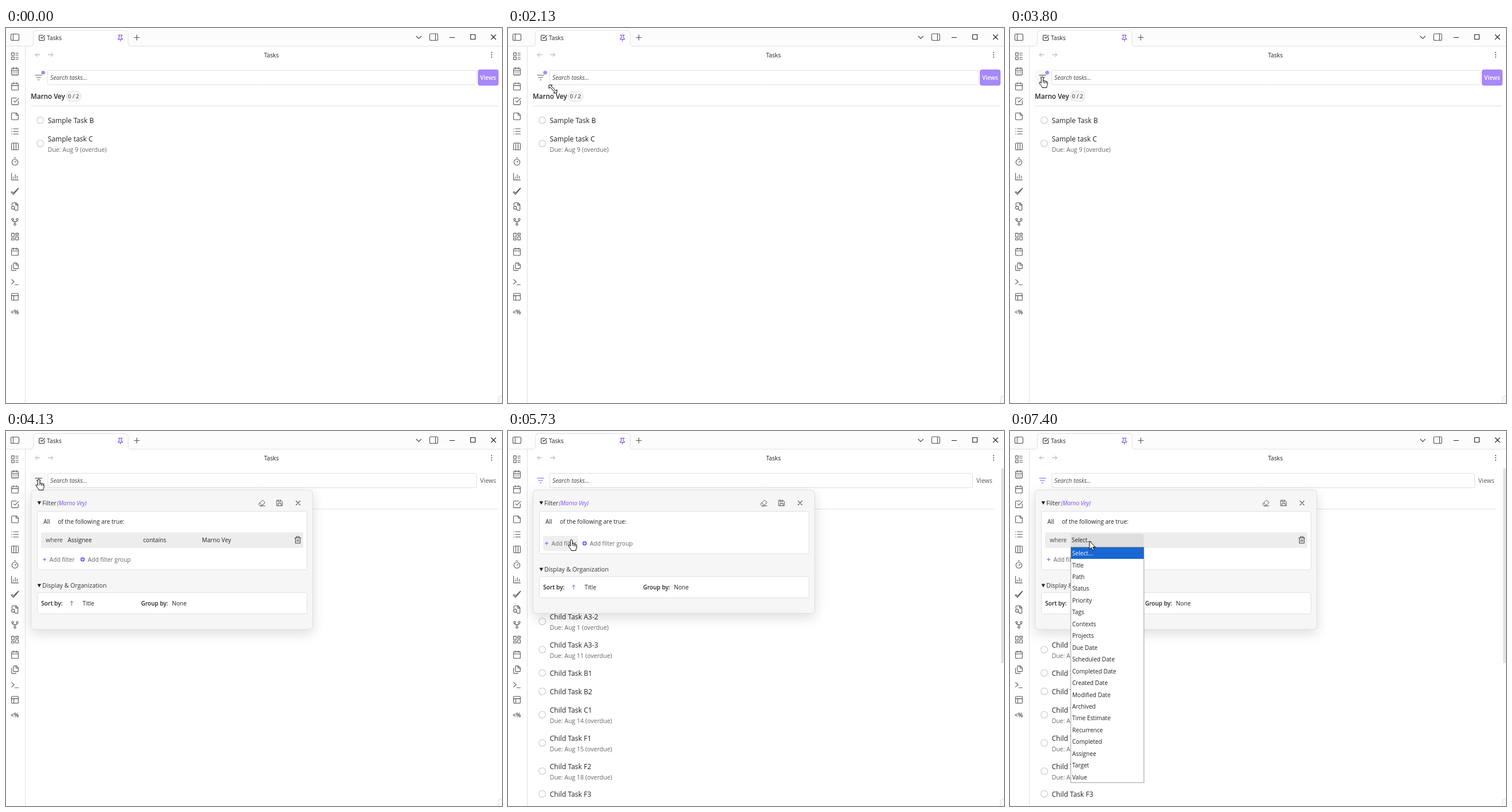
Animation, 861 px wide and 651 px high, one loop 8000 ms. Source, as an HTML page with a canvas:

```html
<!DOCTYPE html>
<html lang="en">
<head>
<meta charset="utf-8">
<title>Tasks</title>
<style>
html, body { margin: 0; width: 100%; height: 100%; overflow: hidden; background: #fff; }
canvas { display: block; }
</style>
</head>
<body>
<canvas id="stage" width="861" height="651"></canvas>
<script>
const ctx = document.getElementById('stage').getContext('2d');
const LOOP = 8000, STEP = 200 / 3;
const PURPLE = '#7c4df0', LILAC = '#a688fa', INK = '#222', GREY = '#555', MUTED = '#666', EDGE = '#e0e0e0';
const PERSON = 'Marno Vey';

// Path builders on a 24 unit icon grid
const box = (x, y, w, h) => `M${x} ${y}h${w}v${h}h${-w}z`;
const ring = (x, y, r) => `M${x - r} ${y}a${r} ${r} 0 1 0 ${2 * r} 0a${r} ${r} 0 1 0 ${-2 * r} 0`;
const frame = (x, y, w, h) => `M${x + 2} ${y}h${w - 4}q2 0 2 2v${h - 4}q0 2-2 2h${4 - w}q-2 0-2-2v${4 - h}q0-2 2-2z`;
const calendar = frame(3, 4, 18, 18) + 'M8 2v4M16 2v4M3 10h18';
const checkSquare = 'M21 11v8q0 2-2 2H5q-2 0-2-2V5q0-2 2-2h11M9 11l3 3L22 4';

const sidebar = [
  box(3, 3, 7, 7) + box(3, 14, 7, 7) + 'M14 4h7M14 9h7M14 15h7M14 20h7',
  calendar + 'M7 14h1M11.5 14h1M16 14h1M7 18h1M11.5 18h1M16 18h1',
  calendar,
  checkSquare,
  'M16 3H5q-2 0-2 2v14q0 2 2 2h14q2 0 2-2V8zM15 3v4q0 2 2 2h4',
  'M8 5h13M8 12h13M8 19h13M3 5h1M3 12h1M3 19h1',
  frame(3, 3, 18, 18) + 'M9 3v18M15 3v18',
  ring(12, 14, 8) + 'M10 2h4M12 14l3-3',
  'M3 3v18h18M8 17v-4M13 17V7M18 17v-6',
  'M2 14l6 6L22 3M2 14l2-2 4 4L21 3',
  'M4 9V4q0-2 2-2h9l5 5v13q0 2-2 2h-5M14 2v6h6' + ring(7, 15, 4) + 'M10 18l3 3',
  ring(12, 19, 2.6) + ring(6, 6, 2.6) + ring(18, 6, 2.6) + 'M6 9q0 3 3 3h6q3 0 3-3M12 12v4',
  box(3, 3, 7, 9) + box(14, 3, 7, 5) + box(14, 12, 7, 9) + box(3, 16, 7, 5),
  calendar,
  'M10 2h6l5 5v8q0 2-2 2h-9q-2 0-2-2V4q0-2 2-2M15 2v6h6M4 8q-1 0-1 2v10q0 2 2 2h10',
  'M3 18l7-6-7-6M12 20h9',
  frame(3, 3, 18, 18) + 'M3 9h18M9 9v12'
];

const glyphs = {
  pin: 'M12 17v6M5 17h14v-2l-4-4V6q3 0 3-3H6q0 3 3 3v5l-4 4z',
  eraser: 'M7 21l-4-4q-2-2 0-3L13 4q1-1 3 0l5 5q1 1 0 3l-9 9zM22 21H7M5 11l9 9',
  save: 'M3 3h13l5 5v13H3zM7 3v5h8V3M7 21v-8h10v8',
  trash: 'M3 6h18M5 6v16h14V6M8 6V2h8v4M10 11v6M14 11v6',
  close: 'M5 5l14 14M19 5L5 19',
  up: 'M12 22V3M6 9l6-6 6 6',
  plus: 'M12 4v16M4 12h16'
};

const cursors = {
  arrow: 'M0 0V14.6L3.3 11.5 5.7 16.6 8 15.5 5.7 10.6H10.3z',
  hand: 'M-1.8 1.6a1.8 1.8 0 0 1 3.6 0V7c.3-1.2 2.7-1 2.7.5.4-1 2.5-.8 2.5.7.4-.8 2-.5 2 1V13c0 2.3-1.3 3-1.3 5.6H0C-.5 16-3.5 13.5-4.8 11c-.9-2 1-2.8 2-1.5l1 1.2zM1.8 7v3M4.5 7.5V11M7 8.5V11',
  resize: 'M-7-7H-1L-3-5 5 3 7 1V7H1L3 5-5-3-7-1z'
};

// Pointer track: time, x, y, shape
const track = [
  [600, 16, 12, 'resize'], [1200, 129, 159, 'resize'], [1267, 127, 157, 'resize'], [1467, 127, 157, 'resize'],
  [1733, 245, 250, 'resize'], [1867, 205, 214, 'resize'], [2133, 78, 106, 'resize'], [2333, 53, 81, 'resize'],
  [2400, 54, 75, 'hand'], [2733, 57, 77, 'hand'], [3133, 57, 77, 'hand'], [3800, 56, 85, 'hand'],
  [4000, 56, 85, 'hand'], [4333, 58, 83, 'hand'], [4933, 58, 83, 'hand'], [5000, 59, 84, 'hand'],
  [5533, 116, 185, 'hand'], [5600, 116, 185, 'hand'], [5933, 100, 194, 'hand'], [6267, 99, 194, 'arrow'],
  [6667, 99, 194, 'arrow'], [7067, 138, 191, 'arrow'], [LOOP, 138, 191, 'arrow']
];

const tasks = [
  ['Child Task A3-2', 322, 'Aug 1'], ['Child Task A3-3', 371, 'Aug 11'], ['Child Task B1', 420],
  ['Child Task B2', 452], ['Child Task C1', 484, 'Aug 14'], ['Child Task F1', 533, 'Aug 15'],
  ['Child Task F2', 582, 'Aug 18'], ['Child Task F3', 630]
];

const options = ['Select...', 'Title', 'Path', 'Status', 'Priority', 'Tags', 'Contexts', 'Projects', 'Due Date',
  'Scheduled Date', 'Completed Date', 'Created Date', 'Modified Date', 'Archived', 'Time Estimate', 'Recurrence',
  'Completed', 'Assignee', 'Target', 'Value'];

function text(str, x, middle, size = 10.2, color = INK, style = '') {
  ctx.font = `${style} ${size}px "Open Sans", "Noto Sans", sans-serif`;
  ctx.fillStyle = color;
  ctx.fillText(str, x, Math.round(middle + size * 0.36));
}

function panel(x, y, w, h, r, fill, edge) {
  ctx.beginPath();
  ctx.roundRect(x, y, w, h, r);
  if (fill) { ctx.fillStyle = fill; ctx.fill(); }
  if (edge) { ctx.strokeStyle = edge; ctx.lineWidth = 1; ctx.stroke(); }
}

function rect(x, y, w, h, color) {
  ctx.fillStyle = color;
  ctx.fillRect(x, y, w, h);
}

function stroke(d, color, width = 1) {
  ctx.strokeStyle = color;
  ctx.lineWidth = width;
  ctx.stroke(new Path2D(d));
}

function icon(d, x, y, scale = 0.65, color = GREY, width = 1.1) {
  ctx.save();
  ctx.translate(x, y);
  ctx.scale(scale, scale);
  ctx.translate(-12, -12);
  ctx.lineCap = ctx.lineJoin = 'round';
  stroke(d, color, width / scale);
  ctx.restore();
}

function disc(x, y, r, color) {
  ctx.fillStyle = color;
  ctx.fill(new Path2D(ring(x, y, r)));
}

function drawChrome() {
  rect(0, 0, 861, 651, '#fff');
  rect(0, 0, 861, 31, '#fcfcfc');
  rect(0, 31, 861, 1, EDGE);
  rect(33, 32, 1, 619, EDGE);
  ctx.fillStyle = '#fff';
  const tab = 'M42 31.5q5.5 0 5.5-5V10q0-5.5 6-5.5H206q6 0 6 5.5V26.5q0 5 6 5';
  ctx.fill(new Path2D(tab + 'V33H42z'));
  stroke(tab, EDGE);

  stroke(frame(8.5, 10.5, 14, 11) + 'M12.5 10.5v11', GREY, 1.1);
  stroke(frame(735.5, 10, 14, 11.5) + 'M745.5 10v11.5', GREY, 1.1);
  icon(checkSquare, 62, 17, 0.5, '#333');
  text('Tasks', 71, 17);
  icon(glyphs.pin, 198.5, 17, 0.53, PURPLE);
  stroke('M222 16.5h10M227 11.5v10', GREY, 1.2);
  stroke('M712 14l4.5 4.5L721 14', '#444', 1.1);
  stroke('M770 16.5h9' + box(806.5, 11.5, 8, 8) + 'M842 11.5l8.5 8.5M850.5 11.5L842 20', '#222', 1.1);

  stroke('M59 46.5h-8M54.5 43l-3.5 3.5 3.5 3.5M73 46.5h8M78 43l3.5 3.5-3.5 3.5', '#aaa');
  text('Tasks', 448, 47);
  for (let i = -1; i < 2; i++) disc(843, 46.5 + i * 4, 1, '#444');

  sidebar.forEach((d, i) => icon(d, 15.5, 49 + i * 26.1));
  text('<%', 8, 493, 10, '#444', '600');
  panel(854.5, 638.5, 12, 20, 5, '#f8f8f8', '#ddd');
}

function drawToolbar(t) {
  const listed = t >= 4270, open = t >= 3870;
  const hover = t >= 2400 && t < 5060;
  const shift = listed ? 10 : 0;
  const active = t < 4070 ? 1 : t < 4130 ? 0.4 : 0;

  if (hover) panel(43, 72, 27, 27, 4, '#f8f8f8');
  stroke('M50.5 82h12M52.5 86h8M55 90h3', hover ? '#222' : open ? PURPLE : GREY, 1.2);
  if (active === 1) disc(64.5, 77.5, 3.3, LILAC);

  panel(72.5, 73.5, 744 - shift, 25, 2, '#fff', EDGE);
  text('Search tasks...', 77, 86, 10.3, '#444', 'italic');
  ctx.globalAlpha = active;
  panel(819, 72, 36, 28, 4, LILAC);
  ctx.globalAlpha = 1;
  text('Views', 823 - shift, 86, active ? 10 : 10.5, active ? '#fff' : '#555', active ? '600' : '500');
  rect(43, 135, 811 - shift, 1, EDGE);
}

function drawTask(name, y, due) {
  const middle = due ? y + 8.5 : y;
  stroke(ring(59.5, middle, 5.8), '#d6d6d6', 1.5);
  text(name, 72.5, y + 0.5, 12);
  if (due) text(`Due: ${due} (overdue)`, 72.5, y + 19.5, 10.5, MUTED);
}

function drawList(t) {
  if (t >= 4270) {
    tasks.forEach(task => drawTask(...task));
    rect(856, 65, 5, 338, '#e3e3e3');
    return;
  }
  text(PERSON, 43, 119, 11.6, INK, '600');
  panel(104.5, 109.5, 26, 18, 9, '#f5f5f5', EDGE);
  text('0 / 2', 107.5, 119, 9.5);
  drawTask('Sample Task B', 160);
  drawTask('Sample task C', 192, 'Aug 9');
}

function heading(str, y) {
  ctx.fillStyle = INK;
  ctx.fill(new Path2D(`M54.5 ${y - 3}h6.5l-3.25 6z`));
  text(str, 63, y, 10.5, '#333', '500');
}

function drawPopup(t) {
  const cleared = t >= 4270, added = t >= 6270;
  const drop = cleared && !added ? 0 : 28;

  ctx.save();
  ctx.shadowColor = 'rgba(0,0,0,.14)';
  ctx.shadowBlur = 22;
  ctx.shadowOffsetY = 7;
  panel(43.5, 102.5, 489, 214 + drop, 6, '#f6f6f6');
  ctx.restore();
  panel(43.5, 102.5, 489, 214 + drop, 6, null, '#dcdcdc');

  heading('Filter', 125);
  text(`(${PERSON})`, 88.5, 125, 9.9, PURPLE, 'italic');
  icon(glyphs.eraser, 444, 125, 0.55, GREY, 1);
  icon(glyphs.save, 475, 125, 0.53, GREY, 1);
  icon(glyphs.close, 507, 125, 0.5, GREY, 1.1);

  panel(54.5, 139.5, 468, 73.5 + drop, 3, '#fff', EDGE);
  text('All', 65, 157);
  text('of the following are true:', 90, 157, 10.1);

  if (drop) {
    rect(61, 176, 455, 27, '#ededed');
    text('where', 69, 189, 10.2, '#444');
    if (t >= 6800) panel(106, 178.5, 126, 24, 3, '#dedede');
    if (added) text('Select...', 107, 189, 9.9);
    else {
      text('Assignee', 107, 189);
      text('contains', 238, 189);
      text(PERSON, 340, 189);
    }
    icon(glyphs.trash, 506.5, 189, 0.58, '#444', 1.1);
  }

  const y = 195 + drop;
  if (t >= 5530 && !added) panel(61, 182, 61, 26, 4, t >= 6130 ? '#e6e6e6' : '#efefef');
  icon(glyphs.plus, 67, y, 0.32, PURPLE, 1);
  text('Add filter', 75.5, y, 10.2, MUTED);
  disc(133, y, 3.8, PURPLE);
  icon(glyphs.plus, 133, y, 0.29, '#fff', 1);
  text('Add filter group', 142, y, 10.2, MUTED);

  heading('Display & Organization', 240.5 + drop);
  panel(54.5, 252.5 + drop, 468, 37, 3, '#fff', EDGE);
  const row = 271 + drop;
  text('Sort by:', 61, row, 10.2, INK, '600');
  icon(glyphs.up, 114, row, 0.4, PURPLE, 1);
  text('Title', 133, row);
  text('Group by:', 234.5, row, 10, INK, '600');
  text(t < 4070 ? 'Assignee' : 'None', 288, row);
}

function drawOptions() {
  rect(105, 201, 128, 410, '#a0a0a0');
  rect(106, 202, 126, 408, '#fff');
  rect(106, 202, 126, 20, '#1967d2');
  options.forEach((name, i) => text(name, 108, 212.5 + i * 20.45, 10.1, i ? INK : '#fff'));
}

function drawPointer(t) {
  const next = track.findIndex(key => key[0] > t);
  if (next < 1) return;
  const [t0, x0, y0, shape] = track[next - 1], [t1, x1, y1] = track[next];
  const k = (t - t0) / (t1 - t0);
  ctx.save();
  ctx.translate(Math.round(x0 + (x1 - x0) * k), Math.round(y0 + (y1 - y0) * k));
  ctx.lineJoin = 'round';
  ctx.fillStyle = '#fff';
  ctx.fill(new Path2D(cursors[shape]));
  stroke(cursors[shape], '#000', 1);
  ctx.restore();
}

function render() {
  const now = performance.now() % LOOP;
  const t = Math.floor((now + 5) / STEP) * STEP + 1;
  const state = t + 4;
  drawChrome();
  drawToolbar(state);
  drawList(state);
  if (state >= 3870) drawPopup(state);
  if (state >= 7400) drawOptions();
  drawPointer(t);
  requestAnimationFrame(render);
}
render();
</script>
</body>
</html>
```
